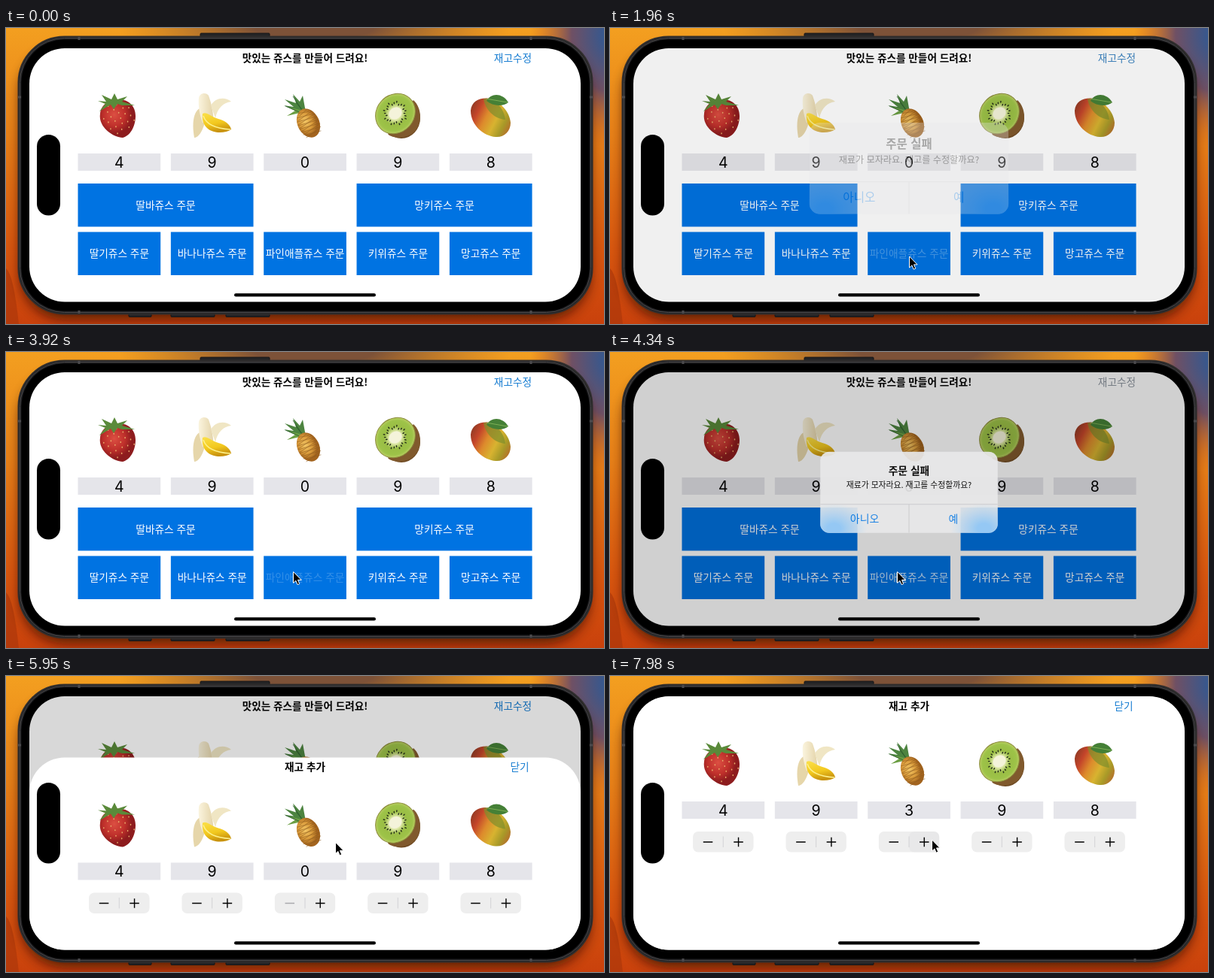
Animation of 794 by 394 pixels, one loop 8 s. Source, as an HTML page:

```html
<!DOCTYPE html>
<html lang="ko">
<head>
<meta charset="utf-8">
<style>
html, body { margin: 0; width: 100%; height: 100%; overflow: hidden; }
svg { display: block; width: 794px; height: 394px; }
text { font: 13.7px "Noto Sans CJK KR", "Noto Sans CJK", sans-serif; text-anchor: middle; }
.bold { font-size: 13.6px; font-weight: 600; }
.num { font: 19.5px Inter, Roboto, sans-serif; }
.small { font-size: 10.65px; }
.white { fill: #fff; }
.blue { fill: #0a7be6; }
</style>
</head>
<body>
<svg viewBox="0 0 794 394">
<defs>
  <linearGradient id="base" x2="0" y2="1">
    <stop offset="0" stop-color="#f39f20"/><stop offset=".35" stop-color="#e88118"/><stop offset=".75" stop-color="#d8560f"/><stop offset="1" stop-color="#c9410c"/>
  </linearGradient>
  <radialGradient id="brown"><stop offset=".3" stop-color="#7d5238"/><stop offset="1" stop-color="#a8642a" stop-opacity="0"/></radialGradient>
  <radialGradient id="navy"><stop offset=".1" stop-color="#35588f"/><stop offset=".5" stop-color="#6f5064"/><stop offset="1" stop-color="#d05a20" stop-opacity="0"/></radialGradient>
  <filter id="blur" x="-10%" y="-20%" width="120%" height="140%"><feGaussianBlur stdDeviation="8"/></filter>
  <radialGradient id="glow"><stop offset=".2" stop-color="#a3d2fa"/><stop offset="1" stop-color="#b4d8f6" stop-opacity="0"/></radialGradient>
  <radialGradient id="berry" cx=".4" cy=".4"><stop offset="0" stop-color="#dc4f42"/><stop offset=".6" stop-color="#bf302b"/><stop offset="1" stop-color="#8d1c1e"/></radialGradient>
  <linearGradient id="pulp"><stop offset="0" stop-color="#fbf4de"/><stop offset="1" stop-color="#e3d3a8"/></linearGradient>
  <linearGradient id="peel" x2=".3" y2="1"><stop offset="0" stop-color="#fbe04a"/><stop offset=".6" stop-color="#f2c81e"/><stop offset="1" stop-color="#c9930e"/></linearGradient>
  <radialGradient id="pine" cx=".4" cy=".4"><stop offset="0" stop-color="#f3c766"/><stop offset=".6" stop-color="#d99a3a"/><stop offset="1" stop-color="#a3641e"/></radialGradient>
  <radialGradient id="kiwi"><stop offset=".3" stop-color="#e3ebb0"/><stop offset=".55" stop-color="#9abd45"/><stop offset=".85" stop-color="#9dc348"/><stop offset="1" stop-color="#b9cd62"/></radialGradient>
  <linearGradient id="mango" x1="0" y1=".2" x2="1" y2=".7"><stop offset="0" stop-color="#8f3a24"/><stop offset=".2" stop-color="#c4452a"/><stop offset=".42" stop-color="#dd8a2c"/><stop offset=".65" stop-color="#d8b330"/><stop offset=".85" stop-color="#a89a28"/><stop offset="1" stop-color="#b4762a"/></linearGradient>
  <clipPath id="screen"><rect x="31" y="27" width="732" height="337.5" rx="47"/></clipPath>
  <clipPath id="card"><rect x="281" y="133.5" width="232" height="106.5" rx="12"/></clipPath>
  <g id="fruits">
    <path d="M125 114C126 102 137 95 149 95C163 95 172 104 172 117C172 132 164 144 155 146C143 146 122 132 125 114Z" fill="url(#berry)"/>
    <g id="pips" fill="#e9b06c"></g>
    <path d="M122 97L133 98L127 89L140 95L144 87L148 95L161 91L154 98L171 103L154 103L148 101L143 108L139 102L124 111L132 101Z" fill="#5a8a3a"/>

    <path d="M260 106C250 108 246 124 250 146C257 145 261 136 264 126Z" fill="#e6d6aa"/>
    <path d="M256 93C257 86 266 85 269 90C273 101 275 112 276 126L261 126C257 116 255 103 256 93Z" fill="url(#pulp)"/>
    <path d="M272 103C278 93 290 91 299 98C289 99 281 106 278 120Z" fill="#f0e6c4"/>
    <path d="M261 114C267 111 273 119 282 121C291 123 298 129 299 135C292 140 276 141 268 134C262 129 260 122 261 114Z" fill="url(#peel)"/>
    <path d="M262 117C266 129 278 134 298 135" fill="none" stroke="#fdf08a" stroke-width="1.600"/>

    <g fill="#4d8440"><path d="M394 115L369 103L382 105L370 95L385 100L381 88L390 98L394 90L398 112Z"/><path d="M390 113L373 117L384 110L377 106L391 109Z" fill="#6c9f45"/><path d="M385 99L397 114M381 91L395 112M371 104L392 113" stroke="#2b5a2c" stroke-width=".8"/></g>
    <g transform="rotate(-25 401.5 126.500)"><ellipse cx="401.500" cy="126.500" rx="14.500" ry="20" fill="url(#pine)"/><path id="hatch" stroke="#8d5a1d" stroke-width=".7" stroke-opacity=".75" fill="none"/></g>

    <ellipse cx="525" cy="120" rx="25" ry="27" fill="#6f4a22"/>
    <path d="M541 96C554 108 553 133 537 142C523 149 510 145 507 141Z" fill="#80592d"/>
    <ellipse cx="517" cy="114" rx="28" ry="25" transform="rotate(-48 517 114)" fill="url(#kiwi)" stroke="#8a8a3a"/>
    <ellipse cx="517" cy="113.500" rx="9" ry="7.500" transform="rotate(-35 517 113.500)" fill="#f4f3da"/>
    <g id="seeds" fill="#26301a"></g>

    <path d="M617 110C618 97 630 92 642 94C655 97 669 111 670 126C670 138 661 146 650 145C635 144 617 130 617 110Z" fill="url(#mango)"/>
    <path d="M634 94C650 95 661 106 663 122C648 121 636 108 634 94Z" fill="#7f8f2c" opacity=".7"/>
    <path d="M638 97C644 86 659 86 667 99C660 105 646 104 638 97Z" fill="#458036"/>
    <path d="M637 94L666 99" stroke="#7eb055"/>
  </g>
</defs>

<rect width="794" height="394" fill="url(#base)"/>
<ellipse cx="410" cy="0" rx="260" ry="50" fill="url(#brown)"/>
<ellipse cx="806" cy="10" rx="110" ry="150" fill="url(#navy)"/>
<path d="M0 320Q10 328 17 394H0Z" fill="#a8360a" opacity=".6"/>
<rect x="18" y="26" width="758" height="362" rx="61" fill="#2a0c04" opacity=".7" filter="url(#blur)"/>

<g fill="#242426" stroke="#151517">
  <rect x="258" y="7" width="92" height="8" rx="1"/>
  <rect x="163" y="377" width="30" height="7.500" rx="1"/>
  <rect x="219" y="377" width="58" height="7.500" rx="1"/>
  <rect x="292" y="377" width="58" height="7.500" rx="1"/>
</g>
<rect x="16.500" y="11.500" width="762" height="369" rx="61" fill="#1c1c1e" stroke="#302e2e" stroke-width="2"/>
<rect x="18.500" y="13.500" width="758" height="365" rx="59" fill="none" stroke="#4a494b"/>
<rect x="20.500" y="15.500" width="754" height="361" rx="57"/>
<path d="M97 12V16M697 12V16M97 376V380M697 376V380M16 92H20M775 92H779" stroke="#4b4a4d" stroke-width="3"/>

<g clip-path="url(#screen)">
  <rect x="31" y="27" width="732" height="338" fill="#fff"/>
  <text class="bold" x="397" y="45">맛있는 쥬스를 만들어 드려요!</text>
  <text id="edit" x="673" y="45">재고수정</text>
  <g id="main"></g>
  <rect id="dim" x="31" y="27" width="732" height="338"/>

  <g id="alert">
    <g clip-path="url(#card)">
      <rect x="281" y="133" width="232" height="108" fill="#e9e9ea"/>
      <ellipse cx="299" cy="234" rx="44" ry="33" fill="url(#glow)"/>
      <ellipse cx="495" cy="234" rx="44" ry="33" fill="url(#glow)"/>
      <path d="M281 202.500H513M397 202.500V240" stroke="#cbcbce"/>
      <rect id="press" y="203" width="116" height="38" opacity=".09"/>
    </g>
    <text class="bold" x="397" y="163.500">주문 실패</text>
    <text class="small" x="397" y="181.200">재료가 모자라요. 재고를 수정할까요?</text>
    <text class="blue" x="339" y="226">아니오</text>
    <text class="blue" x="455" y="226">예</text>
  </g>

  <g id="sheet">
    <rect x="31" y="27" width="732" height="420" rx="47" fill="#fff"/>
    <text class="bold" x="397" y="45">재고 추가</text>
    <text x="682" y="45" fill="#147bd1">닫기</text>
    <g id="stock"></g>
  </g>
</g>
<rect x="41" y="142" width="31" height="107.500" rx="15.500"/>
<rect x="303" y="353.300" width="188" height="4.200" rx="2.100"/>
<path id="cursor" d="M0 0V15L3.400 11.900L5.600 17.200L8.200 16.100L6 10.900H10.600Z" stroke="#fff" stroke-linejoin="round"/>
</svg>

<script>
const $ = id => document.getElementById(id);
const colX = i => 95.5 + i * 123.35;
const range = n => [...Array(n).keys()];
const counts = [4, 9, 0, 9, 8];

// Fruit details
$('pips').innerHTML = range(22).map(i => {
  const a = i * 2.4, r = 4.6 * Math.sqrt(i + .5);
  return `<ellipse cx="${149 + r * Math.cos(a)}" cy="${120 + r * Math.sin(a)}" rx=".8" ry="1.1"/>`;
}).join('');
$('seeds').innerHTML = range(26).map(i => {
  const a = i * 360 / 26, r = 12 + i % 3 * 1.7;
  return `<ellipse cx="${517 + r}" cy="113.5" rx="1.5" ry=".8" transform="rotate(${a} 517 113.5)"/>`;
}).join('');
$('hatch').setAttribute('d', range(7).map(i => {
  const y = 109 + i * 5, w = 14 * Math.sqrt(Math.max(.1, 1 - ((y - 126.5) / 20) ** 2));
  const l = 401.5 - w, r = 401.5 + w;
  return `M${l} ${y}Q401 ${y + 2} ${r} ${y + 4}M${r} ${y}Q401 ${y + 2} ${l} ${y + 4}`;
}).join(''));

// Both screens share the fruit row and the counters
const shelf = name => '<use href="#fruits"/>' + counts.map((n, i) =>
  `<rect x="${colX(i)}" y="167" width="109.7" height="23" fill="#e5e5ea"/>
   <text class="num" id="${name}${i}" x="${colX(i) + 54.8}" y="186">${n}</text>`).join('');
const button = (x, y, w, label, id) =>
  `<rect x="${x}" y="${y}" width="${w}" height="57.5" fill="#0073e2"/>
   <text class="white" id="${id}" x="${x + w / 2}" y="${y + 33.8}">${label}쥬스 주문</text>`;
const stepper = i => {
  const x = colX(i) + 54.8;
  return `<rect x="${x - 40.2}" y="207" width="80.4" height="27.5" rx="7" fill="#eee"/>
    <rect id="plus${i}" x="${x}" y="207" width="40.2" height="27.5" rx="7" fill="#d9d9dc" opacity="0"/>
    <path d="M${x} 213.500V228" stroke="#d2d2d6"/>
    <path id="minus${i}" d="M${x - 26.500} 221h12.500" stroke="#000" stroke-width="1.400"/>
    <path d="M${x + 14} 221h12.500m-6.250 -6.250v12.500" stroke="#000" stroke-width="1.400"/>`;
};
$('main').innerHTML = shelf('m') +
  button(colX(0), 207, 233, '딸바', 'mix0') + button(colX(3), 207, 233, '망키', 'mix1') +
  ['딸기', '바나나', '파인애플', '키위', '망고'].map((s, i) => button(colX(i), 271.5, 109.7, s, 'order' + i)).join('');
$('stock').innerHTML = shelf('s') + counts.map((_, i) => stepper(i)).join('');

// Cursor moves: start, end, x, y
const moves = [
  [210, 1050, 427, 162], [1050, 1610, 397.5, 304], [2240, 2660, 330.5, 226], [2730, 2800, 330.5, 229.5],
  [3360, 3780, 381.5, 292.5], [4620, 5040, 437.5, 221.5], [6510, 6790, 427.5, 218]
];
const clamp = v => Math.min(1, Math.max(0, v));
const mix = (a, b, p) => a + (b - a) * p;
const between = (t, a, b) => t >= a && t < b;
const spring = (t, start, speed) => {
  const x = Math.max(0, t - start) / 1000 * speed;
  return 1 - (1 + x) * Math.exp(-x);
};
const set = (id, values) => {
  for (const k in values) $(id).setAttribute(k, values[k]);
};

function draw(t) {
  const [shown, hidden] = t < 3900 ? [1900, 3255] : [4110, 5420];
  const grow = spring(t, shown, 18);
  const alpha = grow * (1 - spring(t, hidden, 18));
  const rise = spring(t, 5740, 13);

  set('dim', { opacity: .2 * Math.max(alpha, rise) });
  set('edit', { fill: `rgb(${mix(20, 150, alpha)},${mix(123, 150, alpha)},${mix(209, 154, alpha)})` });
  set('alert', {
    opacity: alpha,
    transform: `translate(397 186.75) scale(${1.2 - .2 * grow}) translate(-397 -186.75)`
  });
  set('press', {
    x: t < 4000 ? 281 : 397,
    visibility: between(t, 3150, 3290) || between(t, 5320, 5460) ? 'visible' : 'hidden'
  });

  const [down, up] = t < 3900 ? [1890, 1930] : [3920, 4120];
  set('order2', { opacity: t < down ? 1 : mix(.2, 1, clamp((t - up) / 300)) });

  set('sheet', {
    visibility: t < 5740 ? 'hidden' : 'visible',
    transform: `translate(0 ${338 * (1 - rise)})`
  });
  const added = [7350, 7560, 7770].filter(v => t >= v).length;
  $('s2').textContent = added;
  set('minus2', { stroke: added ? '#000' : '#a9a9ad' });
  const held = [[7280, 7350], [7490, 7560], [7700, 7770], [7910, 8000]].some(([a, b]) => between(t, a, b));
  set('plus2', { opacity: held ? .3 : 0 });

  let x = 772, y = 10;
  for (const [a, b, toX, toY] of moves) {
    const p = clamp((t - a) / (b - a)), e = p * p * (3 - 2 * p);
    x = mix(x, toX, e);
    y = mix(y, toY, e);
  }
  set('cursor', { transform: `translate(${x} ${y})`, visibility: t < 210 ? 'hidden' : 'visible' });
}

const begin = performance.now();
function frame(now) {
  draw(Math.max(0, now - begin) % 8000);
  requestAnimationFrame(frame);
}
draw(0);
requestAnimationFrame(frame);
</script>
</body>
</html>
```
